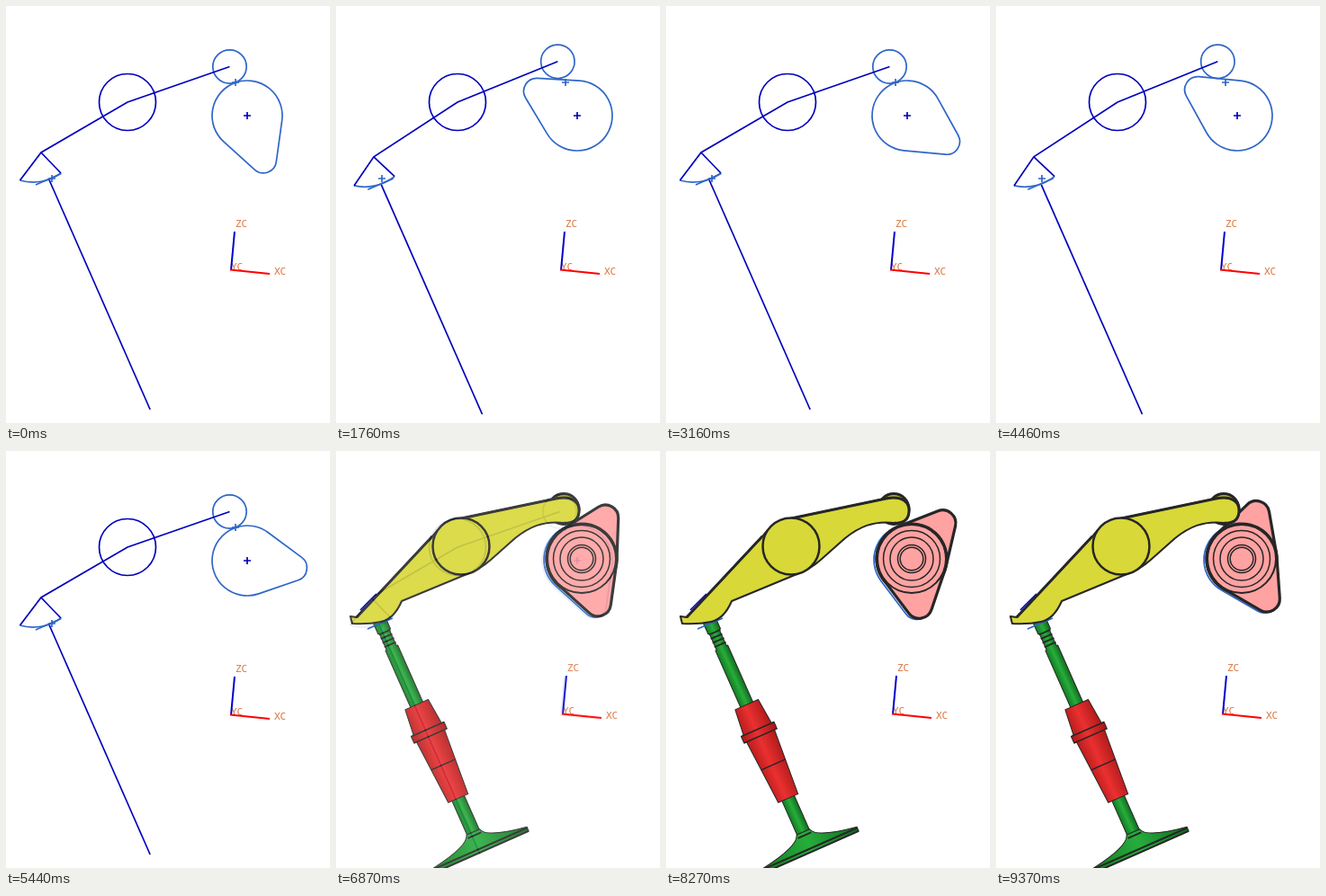
An HTML page without scripts that plays this animation: 360 by 464 pixels, repeating every 9470 ms.

```html
<!DOCTYPE html>
<html lang="en">
<head>
<meta charset="utf-8">
<title>Cam, rocker and valve</title>
<style>
@property --turn { syntax: "<angle>"; inherits: true; initial-value: 70deg; }
@property --lift { syntax: "<number>"; inherits: true; initial-value: 0; }

html, body { margin: 0; width: 100%; height: 100%; overflow: hidden; background: #fff; }
svg {
  display: block; width: 360px; height: 464px; overflow: hidden;
  animation: turn 9.47s linear infinite, lift 9.47s linear infinite;
}
.cam { transform: rotate(var(--turn)); }
.cam-back { transform: rotate(calc(var(--turn) - 130deg)); }
.rocker { transform: rotate(calc(var(--lift) * -1deg)); transform-origin: 135px 107px; }
.solid .rocker { transform-origin: 139px 106px; }
.valve { transform: translateY(calc(var(--lift) * 2px)); }
.solid { animation: reveal 9.47s infinite; }

.navy, .blue { fill: none; stroke-width: 1.7; }
.navy { stroke: #0000bc; }
.blue { stroke: #2f66c8; }
.edge { stroke: #262626; stroke-linejoin: round; }
text { font: 11px "DejaVu Sans Mono", monospace; fill: #d9753f; }

@keyframes turn {
  0%, 4.33% { --turn: 70deg; }
  14.04% { --turn: 160deg; }
  18.58% { --turn: 211deg; }
  24.18% { --turn: 291deg; }
  35.16% { --turn: 413deg; }
  43.5% { --turn: 517deg; }
  55.33% { --turn: 702deg; }
  57.44% { --turn: 728.6deg; }
  61.77% { --turn: 790deg; }
  73.59% { --turn: 790deg; animation-timing-function: steps(2); }
  75.71% { --turn: 839deg; animation-timing-function: steps(8); }
  84.15% { --turn: 1069deg; animation-timing-function: steps(14); }
  98.94%, 100% { --turn: 1498deg; }
}
/* flank, nose, nose, flank: twice eased, then twice in single poses */
@keyframes lift {
  0%, 26.17%, 53.47% { --lift: 0; }
  16.54%, 45.49% { --lift: 0; animation-timing-function: cubic-bezier(.4, 0, .78, .4); }
  19.7%, 47.98% { --lift: 7.9; animation-timing-function: cubic-bezier(.33, .67, .67, 1); }
  21.33%, 49.47% { --lift: 13.6; animation-timing-function: cubic-bezier(.33, 0, .67, .33); }
  22.99%, 50.98% { --lift: 7.9; animation-timing-function: cubic-bezier(.22, .6, .6, 1); }
  73.59%, 83.1%, 95.77%, 100% { --lift: 0; animation-timing-function: step-end; }
  78.87%, 91.55% { --lift: 1; animation-timing-function: step-end; }
  79.93%, 92.6% { --lift: 10.6; animation-timing-function: step-end; }
  80.98%, 93.66% { --lift: 12.1; animation-timing-function: step-end; }
  82.04%, 94.72% { --lift: 1.9; animation-timing-function: step-end; }
}
@keyframes reveal {
  0%, 62.3% { opacity: 0; animation-timing-function: steps(10); }
  73.6%, 100% { opacity: 1; }
}
</style>
</head>
<body>
<svg viewBox="0 0 360 464">
  <defs>
    <path id="lobe" d="M18.2 34.5A39 39 0 1 1 18.2-34.5L59.3-12.8A14.5 14.5 0 0 1 59.3 12.8Z"/>
    <path id="plus" d="M-4 0H4M0-4V4"/>
    <g id="triad" fill="none" stroke-width="2">
      <text x="255" y="246">ZC</text>
      <text x="298" y="299">XC</text>
      <text x="250" y="294">YC</text>
      <path stroke="#0000cd" d="M250 294L254 251"/>
      <path stroke="#f00" d="M249 293.5L293 298"/>
    </g>
    <linearGradient id="green">
      <stop stop-color="#127a22"/>
      <stop offset=".5" stop-color="#27ad3c"/>
      <stop offset="1" stop-color="#116c1e"/>
    </linearGradient>
    <linearGradient id="red">
      <stop stop-color="#b01818"/>
      <stop offset=".45" stop-color="#ea3030"/>
      <stop offset="1" stop-color="#a81616"/>
    </linearGradient>
  </defs>

  <rect width="360" height="464" fill="#fff"/>

  <!-- wireframe -->
  <use href="#triad"/>
  <g transform="translate(268 122)">
    <use href="#lobe" class="cam blue"/>
    <use href="#plus" class="navy"/>
  </g>
  <use href="#plus" class="blue" x="255" y="85"/>
  <use href="#plus" class="blue" x="51" y="192"/>
  <circle class="navy" cx="135" cy="107" r="31.5"/>
  <g class="rocker">
    <circle class="blue" cx="248.5" cy="67.5" r="18.7"/>
    <path class="blue" d="M15.5 194A53 53 0 0 0 61 186"/>
    <path class="navy" d="M248.5 67.5L135 107L39 163L15.5 194M39 163L61 186"/>
  </g>
  <g transform="translate(48 193.5) rotate(-23.7)">
    <g class="valve">
      <path class="blue" d="M-16-1H15"/>
      <path class="navy" d="M0 0V279"/>
    </g>
  </g>

  <!-- shaded model -->
  <g class="solid">
    <rect width="360" height="464" fill="#fff"/>
    <use href="#triad" x="2" y="-1"/>
    <g transform="translate(270 121)"><use href="#lobe" class="cam blue"/></g>
    <path class="navy" d="M289 87L295 75"/>

    <g class="edge" transform="translate(273 120)" fill="#ffa2a2" stroke-width="3.2">
      <use href="#lobe" class="cam-back"/>
      <use href="#lobe" class="cam"/>
      <g fill="none" stroke-width="1.5">
        <circle r="38" stroke-width="2"/>
        <circle r="31.5"/>
        <circle r="24"/>
        <circle r="15.5"/>
        <circle r="12.8"/>
      </g>
    </g>

    <g class="edge" transform="translate(48 188) rotate(-23.85)" stroke-width="1">
      <g class="valve" fill="url(#green)">
        <path d="M-7.500 0H7.500V14H6V34H7.500V262H-7.500V34H-6V14H-7.500Z"/>
        <path fill="none" stroke-width="1.8" d="M-7 15H7M-7 20H7M-7 25H7M-7 30H7"/>
        <path d="M-8 258H8Q11 270 57 277V282H-57V277Q-11 270-8 258Z"/>
        <path fill="none" stroke-width="2" d="M-8 262H8M-57 278H57M-57 282H57"/>
      </g>
      <path fill="url(#red)" d="M-14 103H14L17 133H20V141H17L12 217H-12L-17 141H-20V133H-17Z"/>
      <path fill="none" stroke-width="1.5" d="M-20 133H20M-20 141H20M-14.500 176H14.500"/>
    </g>

    <g class="rocker">
      <path class="navy" d="M27 177L45 159"/>
      <path class="blue" d="M35 198L63 186"/>
      <circle class="edge" cx="253" cy="64.500" r="17" fill="#b9b930" stroke-width="3"/>
      <path class="edge" fill="#d8d838" stroke-width="2"
        d="M139 75L244 53C264 49 271 58 270 68C269 78 262 81 254 80C230 77 214 85 199 97L172 121Q160 132 143 138L73 167C70 174 64 187 50 190Q36 193 18 192L16 184L23 185L107 95Q120 78 139 75Z"/>
      <path class="edge" fill="none" stroke-width="3" d="M139 75L244 53C264 49 271 58 270 68C269 78 262 81 254 80M23 185L107 95"/>
      <circle class="edge" cx="139" cy="106" r="31.500" fill="#d8d838" stroke-width="2.500"/>
    </g>
  </g>
</svg>
</body>
</html>
```
